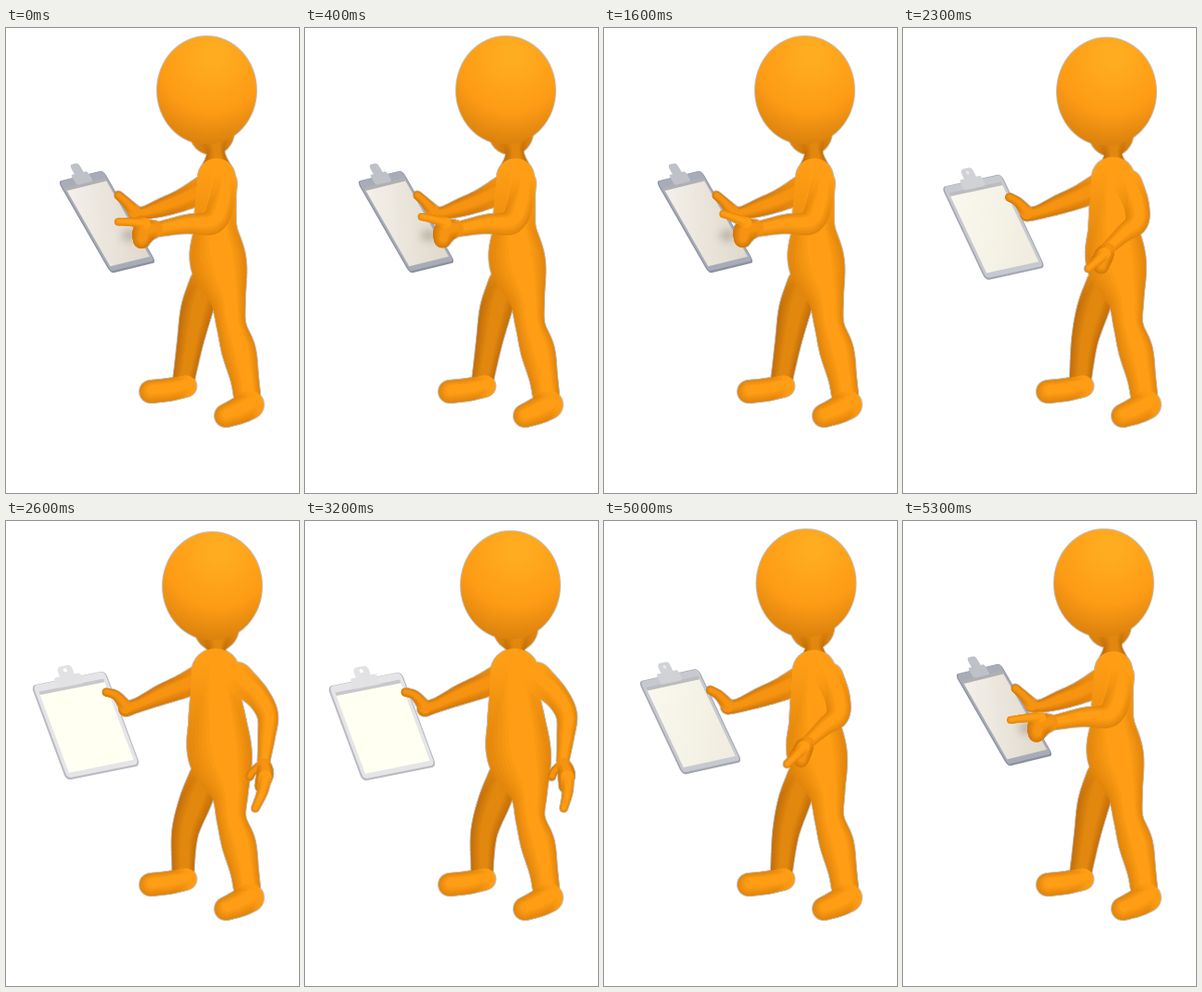
Recreate the animation shown at these times as an HTML page with a canvas. Size 316 by 500 pixels, loop 5.6 s.

```html
<!DOCTYPE html>
<html lang="en">
<head>
<meta charset="utf-8">
<title>Figure with clipboard</title>
<style>
  html, body { margin: 0; width: 100%; height: 100%; overflow: hidden; background: #fff; }
  canvas { display: block; }
</style>
</head>
<body>
<canvas width="316" height="500"></canvas>
<script>
const ctx = document.querySelector('canvas').getContext('2d');
const LOOP = 5600, STEP = 100;

// Colour pairs: shaded edge, lit middle.
const BRIGHT = [[226, 134, 12], [255, 158, 22]];
const SOFT = [[212, 122, 10], [246, 148, 18]];
const DARK = [[196, 112, 10], [226, 136, 15]];

// Joints are [x, y, radius] while writing, then the change of each when showing.
const neck = [[222, 112, 24, 5, 3], [226, 132, 9.5, 1, 5], [227, 158, 18]];
const body = [[227, 160, 20, -1, 3, 6], [226, 190, 22, 0, 0, 5], [226, 218, 23, 2, 0, 8],
  [229, 252, 30, 2, 0, 4], [239, 290, 19, 2, 0, 1], [243, 320, 15.5], [251, 347, 18],
  [257, 375, 15], [260, 395, 14]];
const nearFoot = [[263, 405, 15], [252, 411, 14], [237, 417, 12]];
const farLeg = [[215, 275, 17], [206, 302, 17, -2], [199, 336, 14, -6], [192, 376, 11.5, -1]];
const farFoot = [[194, 385, 11.5], [175, 389, 12], [156, 391, 12]];
const farArm = [[215, 173, 15, -3, -5], [190, 185, 11.5, 0, -7, 1], [168, 193, 9.5, -1, -6, 1],
  [148, 199, 6.5, -6, -1, 1], [138, 198, 7, -9, 4, 1]];
const farThumb = [[138, 197, 7, -9, 3], [129, 187, 5, -10, 1], [121, 180, 4.5, -13, 4]];
const nearArm = [[236, 166, 13, 13, 3, 4], [232, 190, 14, 38, -3, -1], [222, 209, 13, 60, -1, -2],
  [194, 211, 10, 87, 21, -1], [162, 217, 7.5, 116, 41, -1]];
const palm = [[158, 217, 9, 121, 45, -2], [147, 220, 12, 135, 52, -3], [144, 229, 9, 137, 56, -2]];
const finger = [[148, 211, 6, 135, 64, 1], [132, 212, 4.5, 151, 80, 1], [116, 214, 4, 163, 95]];
const thumb = [[150, 225, 7, 125, 39, -2], [145, 229, 6, 123, 41, -2], [143, 232, 5, 123, 43, -1]];

// Board as a tilted unit square: side vectors, then corner.
const boardWriting = [49, -12, 57, 99, 56, 165];
const boardShowing = [80, -16, 38, 102, 24, 178];

const clamp = x => Math.min(1, Math.max(0, x));
const ease = x => { x = clamp(x); return x * x * (3 - 2 * x); };
const mix = (a, b, k) => a.map((v, i) => v + (b[i] - v) * k);
const tint = (a, b, k) => `rgb(${mix(a, b, k)})`;

const pose = (joints, p) =>
  joints.map(([x, y, r, dx = 0, dy = 0, dr = 0]) => [x + dx * p, y + dy * p, r + dr * p]);

// Circles strung along a smooth curve through the joints.
function tube(joints) {
  const steps = 10, last = joints.length - 1, beads = [];
  const at = i => joints[Math.min(last, Math.max(0, i))];
  for (let n = 0; n <= last * steps; n++) {
    const i = Math.floor(n / steps), u = n / steps - i;
    const [a, b, c, d] = [at(i - 1), at(i), at(i + 1), at(i + 2)];
    beads.push(b.map((v, k) => v + u / 2 * (c[k] - a[k]
      + u * (2 * a[k] - 5 * v + 4 * c[k] - d[k] + u * (3 * (v - c[k]) + d[k] - a[k])))));
  }
  return beads;
}

function disc(x, y, rx, fill, ry = rx) {
  ctx.fillStyle = fill;
  ctx.beginPath();
  ctx.ellipse(x, y, rx, ry, 0, 0, 7);
  ctx.fill();
}

// Shrinking passes shifted to the light; the root blends into the part below it.
function shade(beads, [edge, lit]) {
  const passes = 7;
  for (let k = 0; k < passes; k++) {
    const q = k / (passes - 1);
    beads.forEach(([x, y, r], i) => {
      const root = 1 - i / beads.length / .4;
      disc(x + r * q * .12, y - r * q * .16, r * (1 - .6 * q), tint(edge, lit, Math.max(q, root)));
    });
  }
}

function drawHead(x, y) {
  const glow = ctx.createRadialGradient(x + 8, y - 38, 8, x + 4, y - 30, 98);
  glow.addColorStop(0, '#ffad20');
  glow.addColorStop(.55, '#fd9b15');
  glow.addColorStop(1, '#d07a0b');
  disc(x, y, 53.5, glow, 58);
}

function drawBoard(p, dx, dy) {
  const box = (x, y, w, h, round, fill) => {
    ctx.fillStyle = fill;
    ctx.beginPath();
    ctx.roundRect(x, y, w, h, round);
    ctx.fill();
  };
  const edge = tint([140, 144, 156], [186, 187, 194], p);
  const rim = tint([168, 172, 184], [229, 229, 232], p);
  const metal = tint([190, 193, 199], [226, 226, 228], p);
  const light = ctx.createLinearGradient(0, 0, 1, 1);
  light.addColorStop(0, tint([246, 243, 238], [255, 255, 242], p));
  light.addColorStop(1, tint([222, 214, 200], [255, 255, 242], p));

  ctx.save();
  ctx.translate(dx, dy);
  ctx.transform(...mix(boardWriting, boardShowing, p));
  box(0, 0, 1, 1, .06, edge);
  box(.025, .005, .96, .975, .05, rim);
  box(.07, .1, .87, .83, 0, light);
  box(.07, .075, .87, .035, 0, tint([176, 176, 178], [200, 200, 204], p));
  box(.32, -.03, .36, .11, .03, metal);
  box(.4, -.13, .2, .13, .05, metal);
  disc(.5, -.085, .025, `rgba(255,255,255,${p})`, .02);
  ctx.restore();
}

function draw(t) {
  const p = t < 4000 ? ease((t - 2000) / 600) : 1 - ease((t - 4700) / 600);
  const sway = t < 2600 ? p : t < 4600 ? clamp((3200 - t) / 600)
    : -Math.sin(Math.PI * clamp((t - 4600) / 700));
  const reach = t < 2600 ? (.35 + .65 * Math.sin(Math.PI * t / 2300)) * (1 - p) : 0;
  const swing = Math.max(0, sway) * p * .2;

  const limb = joints => tube(pose(joints, p));
  // Hand parts slide along the paper, then swing from the wrist.
  const handPart = (joints, slideX, slideY) => tube(pose(joints, p).map(([x, y, r], i) =>
    [x + reach * (6 + slideX * i) - (y - 258) * swing, y + reach * (slideY * i - 2), r]));

  const rear = [[limb(farLeg), DARK], [limb(farFoot), BRIGHT], [limb(farArm), SOFT],
    [limb(farThumb), SOFT], [limb(neck), DARK]];
  const front = [[limb(body), BRIGHT], [limb(nearFoot), BRIGHT], [limb(nearArm), BRIGHT],
    [handPart(thumb, 0, 0), SOFT], [handPart(palm, 0, 0), SOFT], [handPart(finger, 4, -7), BRIGHT]];
  const parts = [...rear, ...front];
  const headX = 216.5 + 5 * p + sway, headY = 67 + 2 * p + sway;

  ctx.fillStyle = '#fff';
  ctx.fillRect(0, 0, 316, 500);
  const halo = '#c4c0ba';
  for (const [beads] of parts) beads.forEach(([x, y, r]) => disc(x, y, r + 1, halo));
  disc(headX, headY, 54.5, halo, 59);

  drawBoard(p, 3 * sway, -sway);
  ctx.filter = 'blur(4px)';
  disc(133, 223, 8, `rgba(110,95,75,${.35 * clamp(1 - 3 * p)})`, 6);
  ctx.filter = 'none';

  for (const part of parts) shade(...part);
  drawHead(headX, headY);
}

function tick() {
  draw(Math.floor(performance.now() % LOOP / STEP) * STEP);
  requestAnimationFrame(tick);
}
tick();
</script>
</body>
</html>
```
